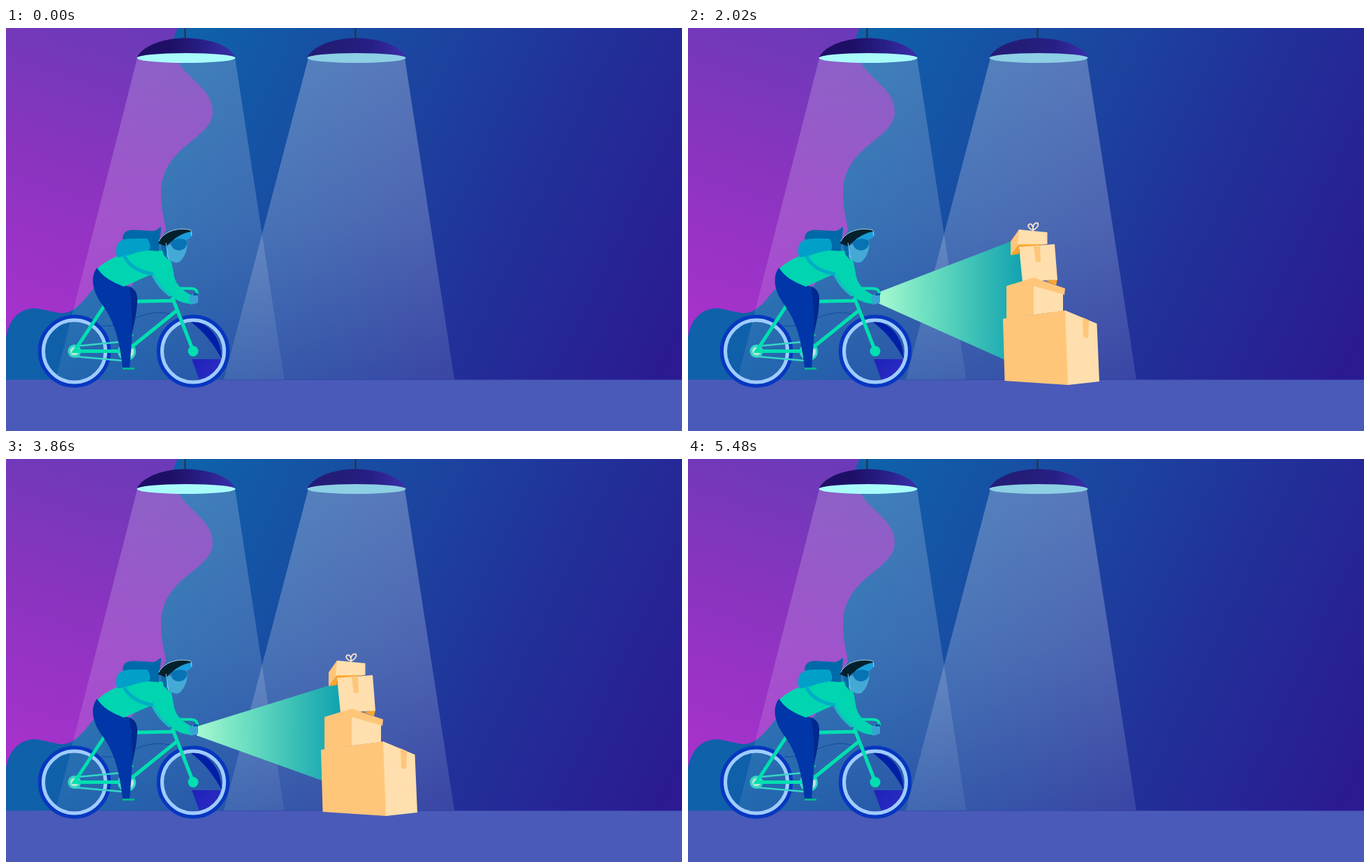
An HTML page with a canvas that plays this animation: 968 by 578 pixels, repeating every 6380 ms.

```html
<!DOCTYPE html>
<html lang="en">
<head>
<meta charset="utf-8">
<title>Night ride</title>
<style>
html, body { margin: 0; width: 100%; height: 100%; overflow: hidden; background: #1b45a0; }
canvas { display: block; width: 968px; height: 578px; }
</style>
</head>
<body>
<canvas id="stage" width="968" height="578"></canvas>
<script>
const W = 968, H = 578, LOOP = 6380;
const TIP = { x: 276.5, y: 387.5 };
const ctx = document.getElementById('stage').getContext('2d');

function gradient(x0, y0, x1, y1, ...colors) {
  const g = ctx.createLinearGradient(x0, y0, x1, y1);
  colors.forEach((c, i) => g.addColorStop(i / (colors.length - 1), c));
  return g;
}

function fill(d, color) {
  ctx.fillStyle = color;
  ctx.fill(new Path2D(d));
}

function stroke(d, color, width) {
  ctx.strokeStyle = color;
  ctx.lineWidth = width;
  ctx.stroke(new Path2D(d));
}

function disc(x, y, rx, color, ry = rx) {
  ctx.fillStyle = color;
  ctx.beginPath();
  ctx.ellipse(x, y, rx, ry, 0, 0, Math.PI * 2);
  ctx.fill();
}

function ring(x, y, r, color, width) {
  ctx.strokeStyle = color;
  ctx.lineWidth = width;
  ctx.beginPath();
  ctx.arc(x, y, r, 0, Math.PI * 2);
  ctx.stroke();
}

function drawBackdrop() {
  ctx.fillStyle = gradient(190, 170, 930, 520, '#0f61aa', '#1a48a1', '#222f99', '#2b1a92');
  ctx.fillRect(0, 0, W, H);
  fill('M0 0H246C236 18 238 34 247 49C261 74 296 88 296 120C296 160 222 168 222 237' +
    'C222 262 227 274 229 290L180 370L125 374C110 392 98 410 78 409' +
    'C60 406 50 402 40 402C20 403 5 416 0 443Z',
    gradient(170, 0, 40, 410, '#6c3ab8', '#8a34c0', '#a432cb'));
}

function drawCones() {
  fill('M188 43H328L398.500 504H71Z',
    gradient(0, 43, 0, 504, 'rgba(255,255,255,.2)', 'rgba(255,255,255,.16)', 'rgba(255,255,255,.07)'));
  fill('M433 43H571L642 504H312Z',
    gradient(0, 43, 0, 504, 'rgba(255,255,255,.27)', 'rgba(255,255,255,.21)', 'rgba(255,255,255,.11)'));
  ctx.fillStyle = '#4a5ab8';
  ctx.fillRect(0, 504.5, W, H);
}

function drawLamp(x, shade, glow) {
  ctx.fillStyle = '#26323c';
  ctx.fillRect(x - 2.5, 0, 2, 16);
  fill(`M${x - 70.5} 42C${x - 61} 24 ${x - 30} 14.500 ${x - 2} 14.500` +
    `C${x + 30} 14.500 ${x + 62} 24 ${x + 70.5} 42Z`,
    gradient(x - 70, 0, x + 70, 0, shade, shade, '#281f86', '#3b2fac'));
  disc(x, 43, 70.5, glow, 7);
}

function drawWheel(x) {
  ring(x, 463.5, 49.5, '#0637bf', 5.5);
  ring(x, 463.5, 44.5, '#9fccff', 5);
}

function drawBike() {
  const green = '#00dfb0', teal = '#35d5c6';
  fill('M262 420C287 420 308 440 309 475C298 454 282 433 262 420Z', '#001fa8');
  fill('M266 475H308C304 491 292 502 277 505Z', gradient(270, 475, 300, 500, '#1f22b8', '#2a2bc4'));
  stroke('M138 427C172 430 185 408 222 408L240 411', '#174a9c', 1);
  stroke('M151 415L156 424', teal, 2.5);
  drawWheel(98);
  drawWheel(268);
  disc(98, 463.5, 9.5, teal);
  disc(98, 463.5, 6, '#b9e6d3');
  disc(173, 464, 13, teal);
  disc(173, 464, 10, '#c6e6e2');
  stroke('M98 456.500L166 450M98 471L166 477', teal, 2.5);
  stroke('M172 463.500H98L141 398M172 392.500L240 391M178 459L246 404M238 386L268 463', green, 5);
  stroke('M244 373.500H264C271 373.500 274 376 274 382', green, 4);
  disc(268, 463.5, 7.5, green);
  stroke('M176 440.500H183M167 488.500H184', '#00b58f', 3);
}

function drawRider() {
  fill('M167 370C184 369 189 380 188 392C187 412 183 426 180 440L169 436Z', '#00288e');
  fill('M130 344C120 358 124 378 138 397C155 421 162 445 167 487H177' +
    'C180 455 184 410 176 371L168 371Z', '#0036a8');
  fill('M131 345C146 330 168 323 190 317L231 320C237 332 239 345 241 357' +
    'C245 371 254 377 265 383L274 388L267 396C250 395 239 388 226 376' +
    'C219 368 213 359 207 354C194 359 183 365 169 371C151 364 139 357 131 345Z', '#00d4b0');
  fill('M167 303C167 291 176 288 190 290L208 291C214 292 218 288 222 285' +
    'C222 298 218 309 219 320L203 319Z', '#0069a9');
  fill('M158 317C158 307 166 302 180 302L202 302C207 309 208 316 204 319' +
    'C188 320 174 328 160 329C157 325 157 321 158 317Z', '#00a0c8');
  stroke('M169 326C176 342 192 350 211 353', '#00aec6', 5);
  stroke('M211 355C216 367 225 376 235 384', '#16bcc3', 4);

  fill('M222 312L230 309L234 334L226 326Z', '#0069a9');
  fill('M231 312L259 303C261 316 257 327 249 335C243 339 234 334 230 328Z', '#45a9d6');
  fill('M236 306C244 300 253 301 259 305C260 313 256 318 248 319C240 319 236 314 236 306Z', '#0873b3');
  fill('M218 309C222 293 245 284 266 290C266 296 255 299 243 301L229 313Z', '#03202d');
  fill('M239 305C247 297 257 293 266 292C268 298 264 303 257 304C250 301 244 302 239 305Z', '#1b9edb');
  stroke('M219 306C225 292 247 285 265 290L266 298', '#a4d9e8', 1);
  stroke('M229 308L233 333', '#84cbe0', 1);

  fill('M262 386L269 380L275 383V394L265 397Z', '#37a3d5');
  stroke('M268 382H275', '#0b4fa8', 3);
}

function drawBoxes() {
  const mid = '#ffc67a', light = '#ffdfad', deep = '#ffa62c';
  fill('M462 326L474 310H514L474 316V324Z', deep);
  fill('M512 363L529 360L527 369Z', deep);
  fill('M474 314L525 310L529 361L479 364Z', light);
  fill('M495 313H504L505 335L498 336Z', mid);
  fill('M462 306L474 289V310L462 326Z', mid);
  fill('M474 289L514.500 293V310L472 310.500Z', light);
  stroke('M494 290C488 288 486 284 488 282C491 279 495 284 494 290' +
    'C493 283 497 278 501 280C503 284 498 288 494 290', '#f6e3cc', 1.8);
  fill('M456 370L495 358L540 373.500L539 383L537 382V405L456 417Z', mid);
  fill('M495 370L537 382V406L495 411Z', light);
  fill('M451 417L541 405L545 512L453.500 506Z', mid);
  fill('M540 405L585.500 424L589 507L544 512Z', light);
  fill('M565 415L574 419L573 445L566 443Z', mid);
}

// The lamp opens, fades down slowly, then opens again fully.
function beamSize(t) {
  if (t < 1780) return Math.max(.003, .87 * (t - 1300) / 480);
  if (t < 3490) return Math.max(.003, .87 * (1 - ((t - 1780) / 1710) ** 1.65));
  return Math.min(1, Math.max(.003, (t - 3490) / 550));
}

function drawBeam(t) {
  const s = beamSize(t);
  const mid = 387 + (t < 3490 ? 0 : 4.5 * s);
  const x0 = 273, x1 = 484, len = x1 - x0;
  const y = (x, side) => mid + s * (side * 9.5 + (.0375 + side * .4985) * (x - x0));
  ctx.globalAlpha = .96;
  fill(`M${x0} ${y(x0, -1)}L${x1} ${y(x1, -1)}V${y(x1, 1)}L${x0} ${y(x0, 1)}Z`,
    gradient(x0, 0, x0 + len * .95, 0, '#acffd2', '#70e5c2', '#3fc6b7', '#13a7b1'));
  ctx.globalAlpha = 1;
}

// Beam and boxes shrink together into the tip of the lamp.
function groupScale(t) {
  const p = Math.min(1, Math.max(0, (t - 4720) / 660));
  return Math.max(.003, 1 - p * p * (3 - 2 * p));
}

function drawDelivery(t) {
  if (t < 1280 || t >= 5480) return;
  const k = groupScale(t);
  ctx.save();
  ctx.translate(TIP.x, TIP.y);
  ctx.scale(k, k);
  ctx.translate(-TIP.x, -TIP.y);
  drawBeam(t);
  drawBoxes();
  ctx.restore();
}

function draw(now) {
  const t = Math.floor((now % LOOP) / 20) * 20;
  drawBackdrop();
  drawCones();
  drawLamp(258, '#1e0f66', '#a9fbfa');
  drawLamp(502, '#231d78', '#8dcfe5');
  drawDelivery(t);
  drawBike();
  drawRider();
  requestAnimationFrame(tick);
}

let start;
function tick(now) {
  start ??= now;
  draw(now - start);
}
requestAnimationFrame(tick);
</script>
</body>
</html>
```
